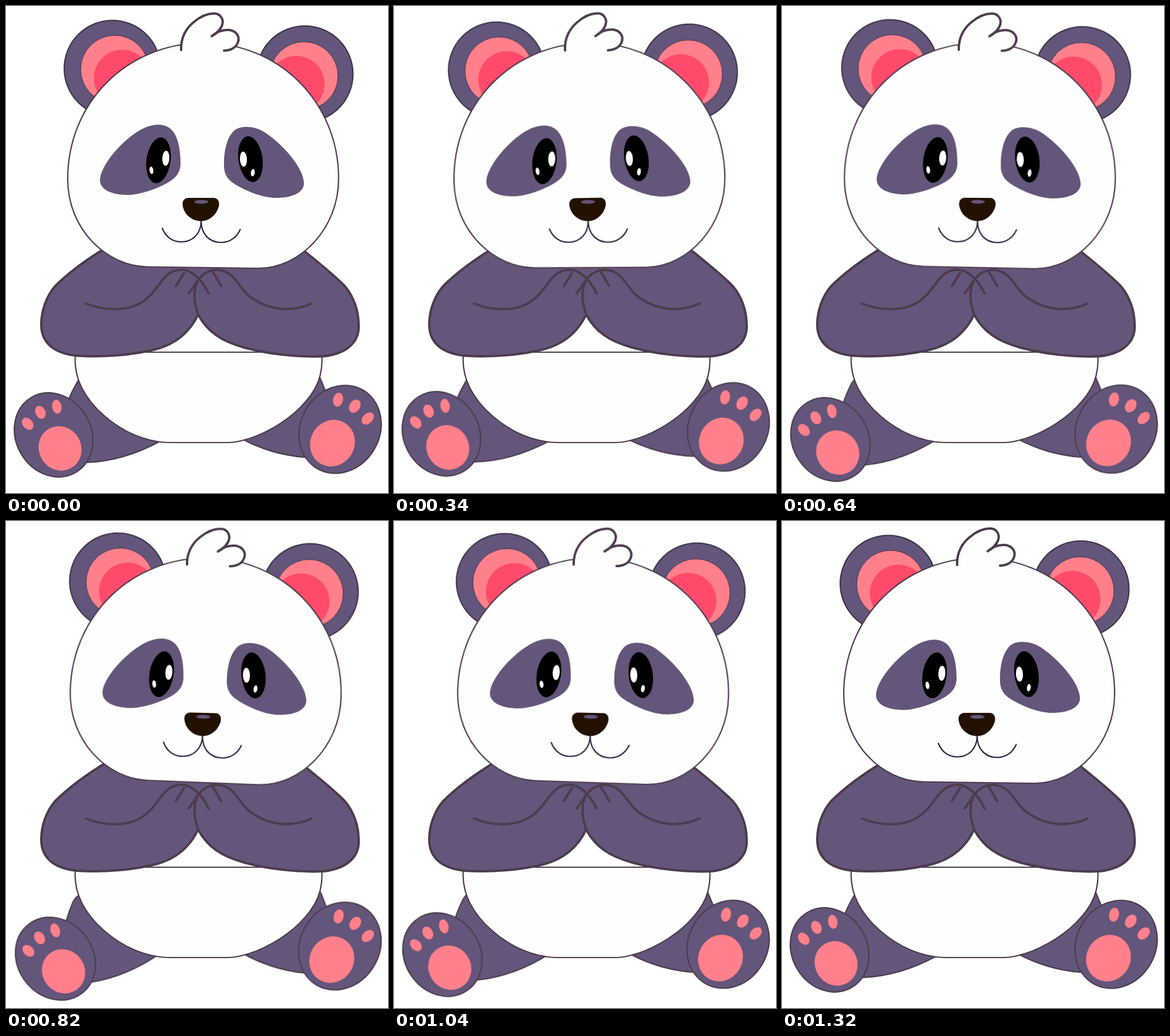
Write an HTML page that moves like this. It is 650 by 830 pixels and loops after 1.34 s.

```html
<!DOCTYPE html>
<html lang="en">
<head>
<meta charset="utf-8">
<title>Panda</title>
<style>
  html, body { margin: 0; width: 100%; height: 100%; overflow: hidden; background: #fff; }
  svg { display: block; width: 650px; height: 830px; }

  .fur { fill: #64557a; }
  .white { fill: #fefefe; }
  .pink { fill: #ff808a; }
  .hot { fill: #ff4a6b; }
  .line { stroke: #4d3b4d; stroke-width: 2.2; }
  .bold { stroke: #4d3b4d; stroke-width: 4; stroke-linecap: round; stroke-linejoin: round; }
  .ink { stroke: #2b2340; stroke-width: 2.2; stroke-linecap: round; stroke-linejoin: round; }
  .none { fill: none; }

  .head, .left, .right { animation: 1340ms linear infinite; }
  .head { transform-origin: 336px 456px; animation-name: nod; }
  .left { transform-origin: 205px 713px; animation-name: kick-left; }
  .right { transform-origin: 470px 708px; animation-name: kick-right; }

  @keyframes nod {
    0% { transform: rotate(0deg); animation-timing-function: cubic-bezier(.333, .323, .667, .839); }
    16.418% { transform: rotate(-1deg); animation-timing-function: cubic-bezier(.333, -.533, .667, -.164); }
    34.328% { transform: rotate(-.67deg); animation-timing-function: cubic-bezier(.333, .264, .667, .659); }
    47.761% { transform: rotate(.42deg); animation-timing-function: cubic-bezier(.333, .344, .667, .811); }
    61.194% { transform: rotate(1.5deg); animation-timing-function: cubic-bezier(.333, -.755, .667, .2); }
    77.612% { transform: rotate(1.17deg); animation-timing-function: cubic-bezier(.333, .287, .667, .649); }
    98.507%, 100% { transform: rotate(0deg); }
  }
  @keyframes kick-left {
    0% { transform: rotate(0deg); animation-timing-function: cubic-bezier(.333, .68, .667, 1); }
    16.418% { transform: rotate(.7deg); animation-timing-function: cubic-bezier(.333, 0, .667, -1.667); }
    34.328% { transform: rotate(.4deg); animation-timing-function: cubic-bezier(.333, .15, .667, .685); }
    47.761% { transform: rotate(-3.6deg); animation-timing-function: cubic-bezier(.333, .371, .667, .929); }
    61.194% { transform: rotate(-7deg); animation-timing-function: cubic-bezier(.333, -.09, .667, .673); }
    77.612% { transform: rotate(-3.75deg); animation-timing-function: cubic-bezier(.333, .361, .667, .838); }
    98.507%, 100% { transform: rotate(0deg); }
  }
  @keyframes kick-right {
    0% { transform: rotate(0deg); animation-timing-function: cubic-bezier(.333, .095, .667, .693); }
    16.418% { transform: rotate(-1.55deg); animation-timing-function: cubic-bezier(.333, .452, .667, 1.209); }
    34.328% { transform: rotate(-2.7deg); animation-timing-function: cubic-bezier(.333, .075, .667, .687); }
    47.761% { transform: rotate(-.3deg); animation-timing-function: cubic-bezier(.333, .375, .667, 1); }
    61.194% { transform: rotate(1.7deg); animation-timing-function: cubic-bezier(.333, 0, .667, .96); }
    77.612% { transform: rotate(-.1deg); animation-timing-function: cubic-bezier(.333, -.93, .667, 2.87); }
    98.507%, 100% { transform: rotate(0deg); }
  }
</style>
</head>
<body>
<svg viewBox="0 0 650 830">
  <!-- legs -->
  <path class="left fur line" d="M170 625C140 622 127 628 120 643C114 654 110 662 107 670L100 770L138 778C185 776 225 762 262 742L230 690Z"/>
  <path class="right fur line" d="M490 615C515 612 527 620 534 633L546 662L560 770L507 769C470 766 435 756 400 737L430 690Z"/>

  <!-- belly -->
  <path class="white line" d="M118 590C115 625 125 655 155 687C190 722 225 738 262 743Q270 744 280 744H378Q388 744 400 741C435 733 475 710 500 685C528 657 541 630 537 590Z"/>

  <!-- feet -->
  <g class="left">
    <ellipse class="fur line" rx="64" ry="74.2" transform="translate(81 731) rotate(-31)"/>
    <g class="pink">
      <ellipse rx="36" ry="38.5" transform="translate(92 754) rotate(-30)"/>
      <ellipse rx="8.5" ry="11.5" transform="translate(37 712) rotate(-40)"/>
      <ellipse rx="8.5" ry="11.5" transform="translate(58.5 692.5) rotate(-25)"/>
      <ellipse rx="8" ry="12" transform="translate(86.5 683) rotate(-10)"/>
    </g>
  </g>
  <g class="right">
    <ellipse class="fur line" rx="67.3" ry="77.4" transform="translate(568.5 721.5) rotate(30)"/>
    <g class="pink">
      <ellipse rx="37.5" ry="40.5" transform="translate(555.5 745) rotate(30)"/>
      <ellipse rx="8.5" ry="12" transform="translate(565 671) rotate(12)"/>
      <ellipse rx="9" ry="12" transform="translate(593.5 682) rotate(32)"/>
      <ellipse rx="8.5" ry="12" transform="translate(615.5 703) rotate(45)"/>
    </g>
  </g>

  <!-- arms and hands -->
  <path class="fur bold" d="M175 409C135 433 108 453 83 478C68 496 60 520 60 543C60 575 83 592 120 596C165 599 215 595 255 585C290 576 313 555 327 526C343 555 365 571 405 582C445 593 495 599 540 597C579 593 602 573 600 543C600 520 592 496 577 478C556 456 531 437 497 409"/>
  <g class="none bold">
    <path d="M136 507C170 521 212 521 238 500C258 484 266 459 285 452C309 443 330 460 345 490"/>
    <path d="M327 526C317 498 319 474 332 461C346 447 367 446 382 458C398 471 402 489 422 500C450 519 488 522 520 507"/>
    <path d="M303 455L289 477M328 465L311 490M352 453L366 477"/>
  </g>

  <g class="head">
    <!-- ears -->
    <g stroke="#3a3048">
      <circle class="fur" cx="181" cy="106.5" r="82" stroke-width="2"/>
      <circle class="pink" cx="185" cy="108" r="58"/>
      <circle class="fur" cx="508.5" cy="116" r="82" stroke-width="2"/>
      <circle class="pink" cx="507" cy="119" r="58"/>
    </g>
    <circle class="hot" cx="198" cy="123" r="48.5"/>
    <circle class="hot" cx="494" cy="133" r="48"/>

    <path class="white line" d="M240 444.5C170 443 105 380 105 295C105 165 205 64 335 63C465 62 566 165 566 294C566 380 500 447 430 447Z"/>
    <path class="white bold" d="M298 75C297 55 306 38 320 27C331 18 342 13 353 12.8C364 12 371 22 368 32C365 41 358 47 350 51.5C360 43 371 40 381 41C392 43 398 52 395 61C392 71 382 76 371 76"/>

    <!-- eyes -->
    <path class="fur" d="M160 297C160 273 195 232 224 214C243 202 262 199 275 206C291 214 297 240 297 268C297 287 285 297 266 306C245 316 222 322 207 322C182 322 160 314 160 297Z"/>
    <path class="fur" d="M371 268C371 244 377 221 390 211C402 203 424 205 440 215C472 236 507 277 507 302C507 319 485 327 460 327C438 327 413 317 395 307C379 298 370 289 371 268Z"/>
    <ellipse rx="20.5" ry="39.3" transform="translate(259.5 263) rotate(8)"/>
    <ellipse rx="20.5" ry="39.3" transform="translate(416 261) rotate(-8)"/>
    <g fill="#fff">
      <ellipse rx="6" ry="12.8" transform="translate(272 259.5) rotate(3)"/>
      <ellipse rx="3.2" ry="6.4" transform="translate(247.5 280) rotate(-8)"/>
      <ellipse rx="6" ry="12.8" transform="translate(404 261) rotate(-3)"/>
      <ellipse rx="3.2" ry="6.2" transform="translate(420 284) rotate(8)"/>
    </g>

    <!-- nose and mouth -->
    <path class="none ink" d="M266 379C272 394 284 402 298 402C318 402 332 388 332 366C332 389 346 403 366 403C381 403 393 394 398.5 381"/>
    <path fill="#231100" d="M311 327H353C361 327 364 334 362 342C358 356 346 366.5 332 366.5C317 366.5 304 356 301 342C299 334 302 327 311 327Z"/>
    <ellipse class="fur" cx="332.3" cy="333.8" rx="12" ry="3.2"/>
  </g>
</svg>
</body>
</html>
```
